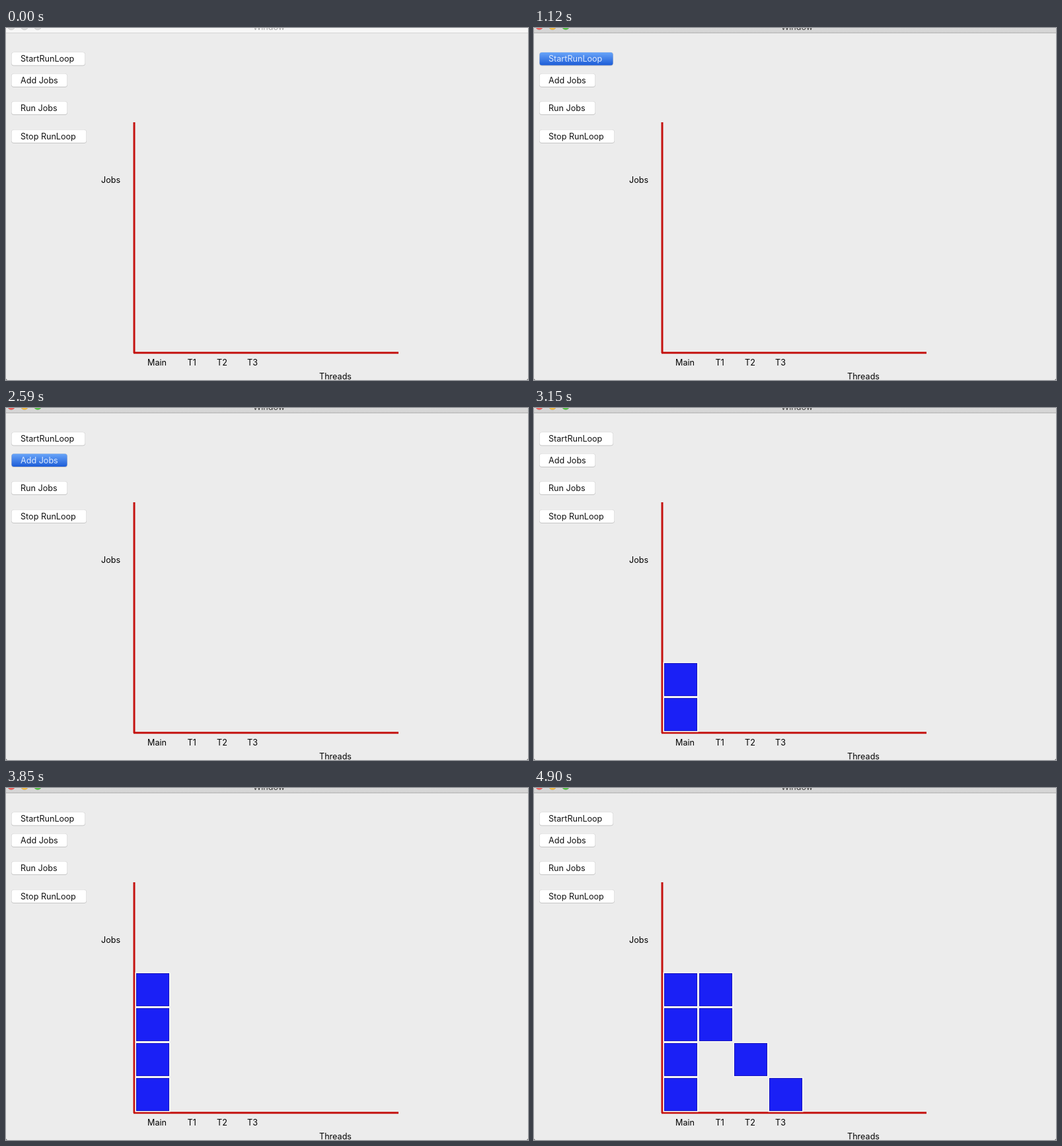
These frames come from a looping animation (790x534 px, 7.07 s). An HTML page:

```html
<!DOCTYPE html>
<html lang="en">
<head>
<meta charset="utf-8">
<title>Run loop</title>
<style>
  html, body { margin: 0; width: 100%; height: 100%; overflow: hidden; background: #ececec; }
  svg { display: block; font: 12.6px Inter, Roboto, sans-serif; }
</style>
</head>
<body>
<svg id="stage" width="790" height="534" viewBox="0 0 790 534">
  <defs>
    <linearGradient id="pressed" x2="0" y2="1">
      <stop offset="0" stop-color="#69a5f9"/>
      <stop offset="1" stop-color="#1c5cd7"/>
    </linearGradient>
    <linearGradient id="bar" x2="0" y2="1">
      <stop offset="0" stop-color="#dadada"/>
      <stop offset="1" stop-color="#d2d2d2"/>
    </linearGradient>
  </defs>
  <rect width="790" height="534" fill="#ececec"/>
  <path d="M0 534v-2l2 2zM790 534v-2l-2 2z" fill="#777"/>
</svg>
<script>
const LOOP = 7070, ACTIVE = 1120;
const stage = document.getElementById('stage');

function add(tag, attrs, text) {
  const el = document.createElementNS('http://www.w3.org/2000/svg', tag);
  for (const key in attrs) el.setAttribute(key, attrs[key]);
  if (text) el.textContent = text;
  return stage.appendChild(el);
}
const label = (text, x, y, more) => add('text', { x, y, ...more }, text);
const show = (el, on) => el.setAttribute('visibility', on ? 'visible' : 'hidden');

// Title bar
const bar = add('rect', { width: 790, height: 7 });
const barEdge = add('rect', { y: 7, width: 790, height: 1 });
const lights = ['#f4625c', '#f6be45', '#58c748'].map((color, i) => ({
  color, el: add('circle', { cx: 8 + 20 * i, cy: -3, r: 5.8, 'stroke-width': 0.8 })
}));
const title = label('Window', 398, 2.5, { 'text-anchor': 'middle' });

// Buttons with the [down, up] times of each press
const buttons = [
  ['StartRunLoop', 37, 111, [[1120, 1260]]],
  ['Add Jobs', 69.5, 84, [[2590, 2730], [3080, 3150], [3360, 3430], [3710, 3780]]],
  ['Run Jobs', 111.5, 84, [[4760, 4830]]],
  ['Stop RunLoop', 154.5, 113, []]
].map(([text, y, width, presses]) => {
  const x = 8.5, height = 19.5, rx = 3.5;
  add('rect', { x: x - 0.5, y: y - 0.3, width: width + 1, height: height + 1.3, rx: 4, fill: '#c6c6c6' });
  const face = add('rect', { x, y, width, height, rx });
  return { face, presses, text: label(text, 22, y + 14.3) };
});

// Chart
add('path', { d: 'M194 143V493M193 492.8H594', stroke: '#c4120f', 'stroke-width': 3 });
label('Jobs', 144, 235);
label('Main', 214, 512);
label('T1', 274.5, 512);
label('T2', 319, 512);
label('T3', 365, 512);
label('Threads', 474, 533);

// Queued jobs land in the first column, then spread over the threads
const [, adder, runner] = buttons;
const ran = runner.presses[0][1];
const blocks = [
  ...adder.presses.map(([, up], row) => [0, row, up]),
  [3, 0, ran], [2, 1, ran], [1, 2, ran], [1, 3, ran]
].map(([col, row, from]) => {
  const x = 197 + 53 * col, y = 440 - 53 * row;
  const halo = add('rect', { x: x - 1.5, y: y - 1.5, width: 53, height: 53, fill: '#f7f7f7' });
  const body = add('rect', { x: x + 0.5, y: y + 0.5, width: 49, height: 49, fill: '#1a20f6', stroke: '#1714bd' });
  return { from, parts: [halo, body] };
});

function draw(now) {
  const t = now % LOOP, active = t >= ACTIVE;
  bar.setAttribute('fill', active ? 'url(#bar)' : '#f7f7f7');
  barEdge.setAttribute('fill', active ? '#b3b3b3' : '#d5d5d5');
  title.setAttribute('fill', active ? '#404040' : '#a8a8a8');
  for (const { el, color } of lights) {
    el.setAttribute('fill', active ? color : '#dddddd');
    el.setAttribute('stroke', active ? '#0002' : '#c8c8c8');
  }
  for (const { face, text, presses } of buttons) {
    const down = presses.some(([from, to]) => t >= from && t < to);
    face.setAttribute('fill', down ? 'url(#pressed)' : '#fff');
    text.setAttribute('fill', down ? '#dce9fe' : '#111');
  }
  for (const { from, parts } of blocks) parts.forEach(part => show(part, t >= from));
}

const start = performance.now();
function tick() {
  draw(performance.now() - start);
  requestAnimationFrame(tick);
}
tick();
</script>
</body>
</html>
```
